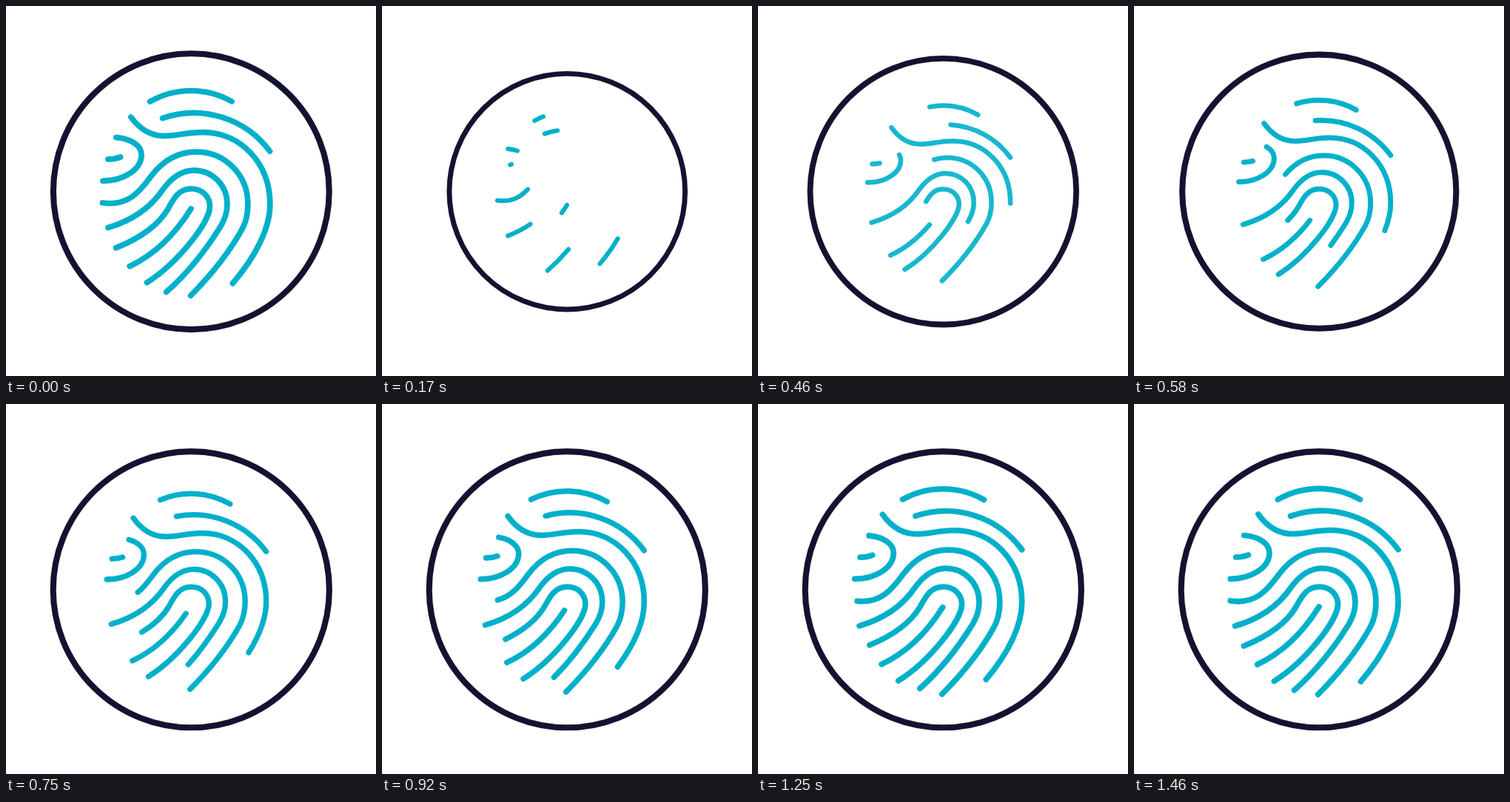
An HTML page that plays this animation: 500x500 px, repeating every 1500 ms.

```html
<!DOCTYPE html>
<html lang="en">
<head>
<meta charset="utf-8">
<title>Fingerprint</title>
<style>
  html, body { margin: 0; width: 100%; height: 100%; overflow: hidden; background: #fff; }
  svg { display: block; width: 100%; height: 100%; fill: none; }
  #ridges { stroke: #00b0ca; stroke-width: 7.7; stroke-linecap: round; stroke-linejoin: round; }
</style>
</head>
<body>
<svg viewBox="0 0 500 500">
  <circle id="ring" cx="250.3" cy="250.7" r="186.6" stroke="#131331" stroke-width="8.1"/>
  <g id="ridges">
    <path pathLength="1" d="M194.5 129A112 112 0 0 1 305.5 129"/>
    <path pathLength="1" d="M211.5 151.5A128 128 0 0 1 357 196.7"/>
    <path pathLength="1" d="M306.5 375C338 338 357 300 357 268C357 212 317 170.5 266 170.5C244 170.5 232 175.5 214 175.5C193 175.5 178 163 168 149"/>
    <path pathLength="1" d="M148.7 177.5C168 179 183 188 183 201C183 222 157 236.5 130.3 236.3"/>
    <path pathLength="1" d="M154.5 204Q147 207 137.7 207"/>
    <path pathLength="1" d="M130.3 266C164 271 180 252 196 230C211 210 231 197 257 197C296 197 327 228 327 268C327 280 325 291 319 302C299 338 275 366 248.6 392.6"/>
    <path pathLength="1" d="M216.6 386.7C248 359 270 330 290 298C296 288 299 279 299 268C299 242 279 222 254 222C238 222 225 230 212 248C195 273 171 290 136.6 300"/>
    <path pathLength="1" d="M148.4 327C178 315 205 298 219 274C227 259 234 247 250 247C265 247 275.5 257 275.5 271C275.5 292 232 348 189.5 374.5"/>
    <path pathLength="1" d="M250 274C230 306 203 335 166.7 352"/>
  </g>
</svg>
<script>
const LOOP = 1500, END = 1480;
const ring = document.getElementById('ring');
const ridges = document.getElementById('ridges');
ridges.style.strokeDasharray = '1 1';

const span = (t, from, to) => Math.min(1, Math.max(0, (t - from) / (to - from)));
const mix = (a, b, u) => a + (b - a) * u;
const easeOut = (u, power) => 1 - (1 - u) ** power;

// CSS-style cubic-bezier easing, solved by bisection
function bezier(x1, y1, x2, y2) {
  const at = (s, a, b) => 3 * (1 - s) ** 2 * s * a + 3 * (1 - s) * s * s * b + s ** 3;
  return u => {
    if (u <= 0 || u >= 1) return u;
    let lo = 0, hi = 1;
    for (let i = 0; i < 24; i++) {
      const mid = (lo + hi) / 2;
      if (at(mid, x1, x2) < u) lo = mid; else hi = mid;
    }
    return at(lo, y1, y2);
  };
}
const sweep = bezier(.22, .57, 0, 1);
const grow = bezier(.2, .3, .15, 1);

// Shrink to `min` until `turn`, then return to full size
const pulse = (t, min, turn, end, back) => t < turn
  ? mix(1, min, easeOut(t / turn, 1.5))
  : mix(min, 1, back(span(t, turn, end)));

const scaleBy = s => `translate(250 250.5) scale(${s}) translate(-250 -250.5)`;

function draw() {
  const t = performance.now() % LOOP;
  ring.setAttribute('transform', scaleBy(pulse(t, .832, 230, 720, u => easeOut(u, 2.4))));
  ridges.setAttribute('transform', scaleBy(pulse(t, .74, 250, END, grow)));
  // One period wipes every ridge away, then redraws it from its far end
  ridges.style.strokeDashoffset = 2 * sweep(span(t, 0, END));
  ridges.style.opacity = t < 250
    ? mix(1, .65, span(t, 180, 250))
    : mix(.65, 1, easeOut(span(t, 250, 700), 2));
  requestAnimationFrame(draw);
}
draw();
</script>
</body>
</html>
```
